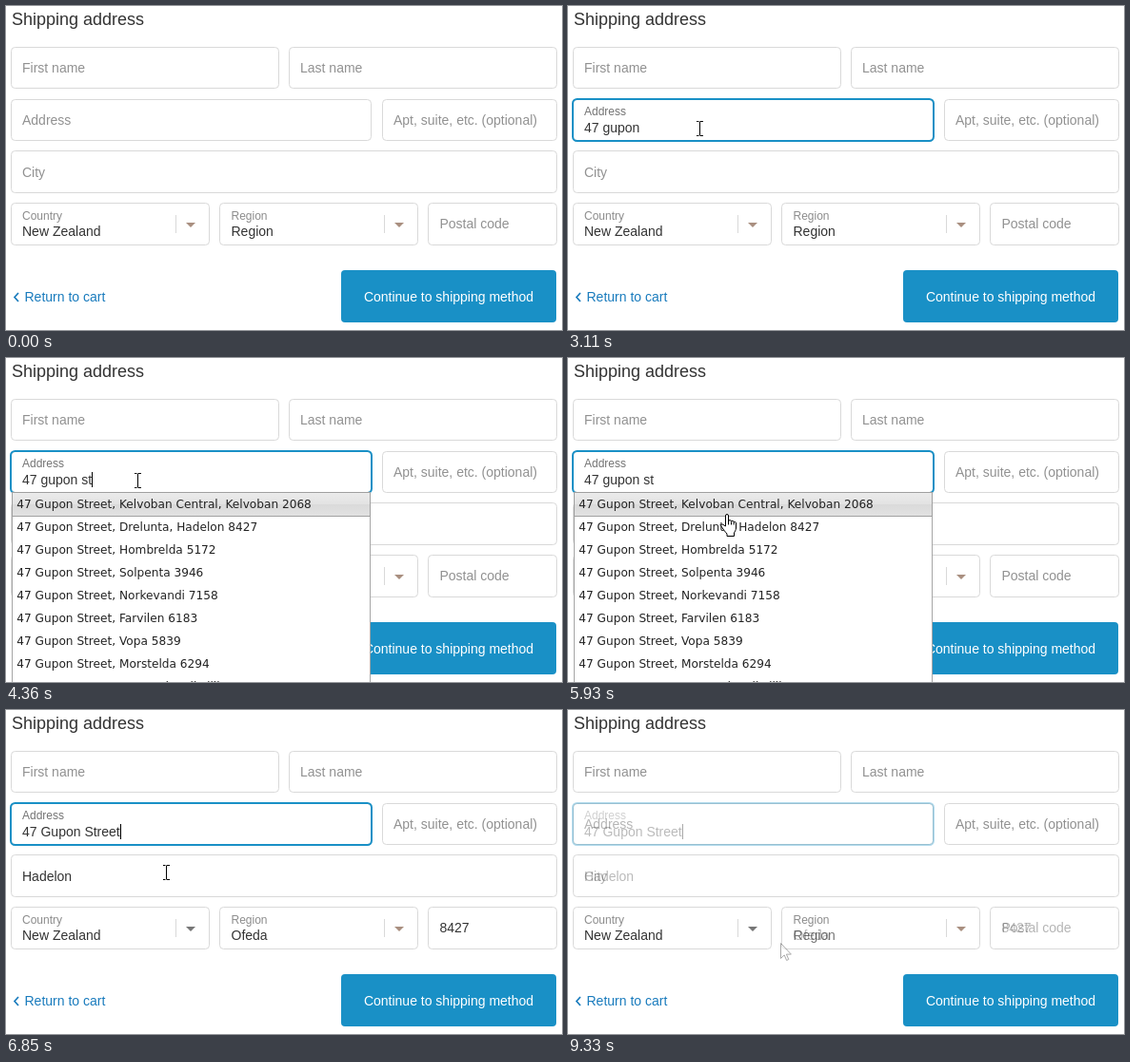
These frames come from a looping animation (584 by 341 pixels, 9400 ms). An HTML page:

```html
<!DOCTYPE html>
<html lang="en">
<head>
<meta charset="utf-8">
<title>Shipping address</title>
<style>
  html, body { margin: 0; width: 100%; height: 100%; overflow: hidden; background: #fff; }
  svg { display: block; }
  text { font: 14px "Liberation Sans", Arial, sans-serif; fill: #333; white-space: pre; }
  .title { font-size: 18px; }
  .hint { fill: #919191; }
  .label { font-size: 12px; fill: #8c8c8c; }
  .link { fill: #197bbd; }
  .box { fill: #fff; stroke: #d9d9d9; }
  .line { stroke: #d9d9d9; }
  .arrow { fill: #a98f80; }
  #rows text { font: 12.15px "DejaVu Sans", Verdana, sans-serif; fill: #222; }
  .pointer { fill: #fff; stroke: #000; stroke-linejoin: round; }
</style>
</head>
<body>
<svg width="584" height="341" viewBox="0 0 584 341">
  <defs>
    <linearGradient id="glass" x2="0" y2="1">
      <stop offset="0" stop-color="#ebebeb"/>
      <stop offset=".48" stop-color="#e3e3e3"/>
      <stop offset=".52" stop-color="#dadada"/>
      <stop offset="1" stop-color="#e2e2e2"/>
    </linearGradient>
  </defs>

  <text class="title" x="6" y="20">Shipping address</text>

  <g class="box">
    <rect x="5.5" y="43.5" width="281" height="43" rx="4"/>
    <rect x="297.5" y="43.5" width="281" height="43" rx="4"/>
    <rect x="5.5" y="98.5" width="378" height="43" rx="4"/>
    <rect x="395.5" y="98.5" width="183" height="43" rx="4"/>
    <rect x="5.5" y="152.5" width="573" height="44" rx="4"/>
    <rect x="5.5" y="207.5" width="208" height="44" rx="4"/>
    <rect x="224.5" y="207.5" width="208" height="44" rx="4"/>
    <rect x="443.5" y="207.5" width="135" height="44" rx="4"/>
  </g>

  <text class="hint" x="17" y="70">First name</text>
  <text class="hint" x="309" y="70">Last name</text>
  <text class="hint" x="407" y="125">Apt, suite, etc. (optional)</text>
  <text class="hint" x="17" y="125" id="hint">Address</text>

  <text class="label" x="17" y="225">Country</text>
  <text x="17" y="242">New Zealand</text>
  <text class="label" x="236.5" y="225">Region</text>
  <path class="line" d="M178.5 220v19M397.5 220v19"/>
  <path class="arrow" id="countryArrow" d="M189 228h10l-5 5z"/>
  <path class="arrow" d="M408 228h10l-5 5z"/>

  <g id="blank">
    <text class="hint" x="17" y="180">City</text>
    <text x="236.5" y="242">Region</text>
    <text class="hint" x="455.5" y="234">Postal code</text>
  </g>
  <g id="filled">
    <text x="17" y="180">Hadelon</text>
    <text x="236.5" y="242">Ofeda</text>
    <text x="455.5" y="234">8427</text>
  </g>

  <path d="M13 302l-4 4.5 4 4.5" fill="none" stroke="#197bbd" stroke-width="1.7"/>
  <text class="link" x="19.5" y="311">Return to cart</text>
  <rect x="352" y="278" width="226" height="55" rx="4" fill="#1990c6"/>
  <text x="465" y="311" text-anchor="middle" style="fill:#fff">Continue to shipping method</text>

  <g id="active">
    <rect id="ring" x="5" y="98" width="379" height="44" rx="4.5" fill="none" stroke="#1990c6" stroke-width="2"/>
    <text class="label" id="label" x="17" y="115" style="fill:#737373">Address</text>
    <text id="value" x="17" y="133"></text>
    <rect id="caret" width="1" height="16" fill="#000"/>
    <g id="menu">
      <rect x="6.5" y="141.5" width="376" height="220" fill="#fff" stroke="#a6a6a6"/>
      <rect id="glow" x="6.5" width="376" height="25" fill="url(#glass)" stroke="#a0a0a0"/>
      <g id="rows"></g>
    </g>
    <path class="pointer" id="beam" d="M-3 -7.5h2.5M.5 -7.5h3.5M.5 -7v14M-3 7.5h2.5M.5 7.5h3.5"/>
    <path class="pointer" id="hand" transform="translate(0 0)" d="M.5 13V2a1.5 1.5 0 0 1 3 0v6a1.4 1.4 0 0 1 3 .3a1.4 1.4 0 0 1 2.7 .6a1.3 1.3 0 0 1 2.3 1V15c0 2-1.5 4-2 5v3.5H2v-2.5C0 19-2.5 15.5-4.2 12.8c-.6-1.6 1.3-2.4 2.4-1.2zM3.5 8v3.5M6.5 8.5v3M9.2 9v2.5"/>
    <path class="pointer" id="tip" d="M.5 .5v16l3.7-3.6 2.4 5.6 2.2-1-2.4-5.4h5z"/>
  </g>
</svg>
<script>
const LOOP = 9400;
const $ = id => document.getElementById(id);

const places = [
  'Valdorena Street, Fendowsha, Morstelda 6294',
  'Morv Avenue, Pemso, Kelvoban 2051',
  'Street, Kelvoban Central, Kelvoban 2068',
  'Street, Drelunta, Hadelon 8427',
  'Street, Hombrelda 5172',
  'Street, Solpenta 3946',
  'Street, Norkevandi 7158',
  'Street, Farvilen 6183',
  'Street, Vopa 5839',
  'Street, Morstelda 6294',
  'Street, Mosrand, Kellsdill 6118'
].map(place => '47 Gupon ' + place);

// Each step changes part of the state and holds until the next one.
const steps = [
  [0, { text: '', caret: false, focus: false, label: 0, query: '', row: 0, done: false, keep: 1, pointer: '' }],
  [300, { pointer: 'beam', at: [138, 129] }],
  [620, { focus: true, caret: true }],
  [930, { caret: false }],
  [1250, { text: '4', caret: true, label: 0.6 }],
  [1550, { text: '47', label: 1 }],
  [1870, { text: '47 g' }],
  [2190, { text: '47 gup' }],
  [2500, { text: '47 gupon ' }],
  [3110, { caret: false }],
  [3430, { query: '47 gupon ' }],
  [3750, { text: '47 gupon s', caret: true }],
  [4050, { text: '47 gupon st' }],
  [4360, { query: '47 gupon st' }],
  [4680, { caret: false }],
  [5300, { caret: true }],
  [5630, { pointer: 'hand', at: [165, 159] }],
  [5930, { caret: false, at: [165, 164] }],
  [6220, { caret: true, at: [168, 171], row: 1 }],
  [6850, { text: '47 Gupon Street', query: '', done: true, pointer: 'beam' }],
  [7460, { caret: false }],
  [7780, { caret: true, pointer: 'tip', at: [223, 245] }],
  [9260, { keep: 2 / 3 }],
  [9330, { keep: 1 / 3 }]
];

const show = (id, on) => { $(id).style.display = on ? '' : 'none'; };

function drawMenu({ query, row }) {
  show('menu', query);
  $('glow').setAttribute('y', 141.5 + 24 * row);
  const found = places.filter(p => query && p.toLowerCase().startsWith(query));
  $('rows').innerHTML = found
    .map((p, i) => `<text x="11.3" y="${158 + 24 * i}">${p}</text>`).join('');
}

function draw(s) {
  $('value').textContent = s.text;
  show('ring', s.focus);
  show('caret', s.caret);
  const width = s.text ? $('value').getComputedTextLength() : 0;
  $('caret').setAttribute('x', 17 + Math.round(width));
  $('caret').setAttribute('y', s.text ? 120 : 112);
  $('label').style.opacity = s.label;
  $('label').setAttribute('y', s.label < 1 ? 117 : 115);

  $('active').style.opacity = s.keep;
  $('hint').style.opacity = s.text ? 1 - s.keep : 1;
  $('filled').style.opacity = s.done ? s.keep : 0;
  $('blank').style.opacity = s.done ? 1 - s.keep : 1;
  $('countryArrow').style.fill = s.done ? '#777' : '';

  for (const id of ['beam', 'hand', 'tip']) {
    show(id, id === s.pointer);
    if (id === s.pointer) $(id).setAttribute('transform', `translate(${s.at})`);
  }
  drawMenu(s);
}

let shown = 0;
function tick() {
  const t = performance.now() % LOOP;
  const past = steps.filter(([start]) => start <= t);
  if (past.length !== shown) {
    shown = past.length;
    draw(Object.assign({}, ...past.map(([, change]) => change)));
  }
  requestAnimationFrame(tick);
}
tick();
</script>
</body>
</html>
```
